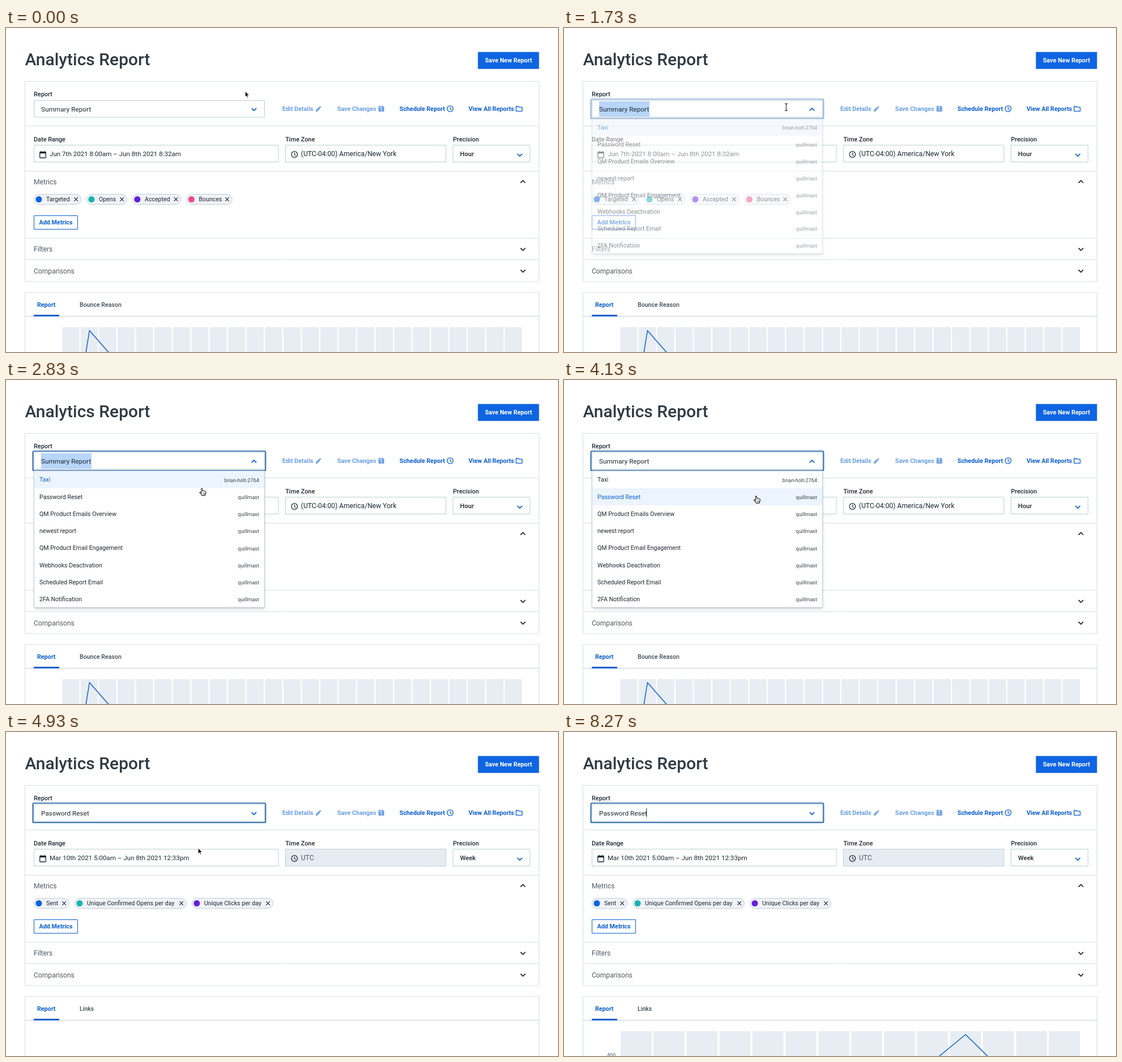
Animation, 975 px wide and 574 px high, one loop 8.43 s. Source, as an HTML page with a canvas:

```html
<!DOCTYPE html>
<html lang="en">
<head>
<meta charset="utf-8">
<title>Analytics Report</title>
<style>
html, body { margin: 0; width: 100%; height: 100%; overflow: hidden; background: #fff; }
canvas { display: block; width: 975px; height: 574px; }
</style>
</head>
<body>
<canvas id="stage"></canvas>
<script>
const W = 975, H = 574, LOOP = 8430;
const BLUE = '#0e64e1', LINK = '#0b5fd0', INK = '#1d2730', GREY = '#4d5862';
const LINE = '#d5dfe8', FIELD = '#b9d0d6', BAR = '#e8edf4';
const canvas = document.getElementById('stage');
const dpr = window.devicePixelRatio || 1;
canvas.width = W * dpr;
canvas.height = H * dpr;
const c = canvas.getContext('2d');

const OPEN = 1630, PRESS = 3900, PICK = 4370, LOADED = 4560, CHART = 6000;
const MENU = [
  ['Taxi', 'brian-holt-2764'], ['Password Reset'], ['QM Product Emails Overview'],
  ['newest report'], ['QM Product Email Engagement'], ['Webhooks Deactivation'],
  ['Scheduled Report Email'], ['2FA Notification']
];
const CHIPS_A = [
  ['Targeted', 49, 133, BLUE], ['Opens', 142, 214, '#17b3b3'],
  ['Accepted', 223, 309.5, '#6320dc'], ['Bounces', 318.5, 400, '#f0478f']
];
const CHIPS_B = [
  ['Sent', 49, 112, BLUE], ['Unique Confirmed Opens per day', 121, 319, '#17b3b3'],
  ['Unique Clicks per day', 328, 472, '#6320dc']
];

const clamp = v => Math.max(0, Math.min(1, v));
const ramp = (t, a, b) => clamp((t - a) / (b - a));
const smooth = p => p * p * (3 - 2 * p);
const mix = (a, b, p) => a + (b - a) * p;

function text(s, x, y, size, color = INK, weight = 400, align = 'left') {
  c.font = `${weight} ${size}px Roboto, sans-serif`;
  c.textAlign = align;
  c.fillStyle = color;
  c.fillText(s, x, y);
}
function rect(x, y, w, h, fill, stroke, width = 1, radius = 0) {
  c.beginPath();
  c.roundRect(x, y, w, h, radius);
  if (fill) { c.fillStyle = fill; c.fill(); }
  if (stroke) { c.strokeStyle = stroke; c.lineWidth = width; c.stroke(); }
}
function poly(points, stroke, width = 1, fill, close) {
  c.beginPath();
  points.forEach(([x, y]) => c.lineTo(x, y));
  if (close) c.closePath();
  if (fill) { c.fillStyle = fill; c.fill(); }
  if (stroke) { c.strokeStyle = stroke; c.lineWidth = width; c.stroke(); }
}
function dot(x, y, r, fill, stroke, width = 1) {
  c.beginPath();
  c.arc(x, y, r, 0, Math.PI * 2);
  if (fill) { c.fillStyle = fill; c.fill(); }
  if (stroke) { c.strokeStyle = stroke; c.lineWidth = width; c.stroke(); }
}
function chevron(x, y, up, color) {
  const d = up ? -2.1 : 2.1;
  poly([[x - 4.2, y - d], [x, y + d], [x + 4.2, y - d]], color, 1.8);
}
function clock(x, y, r, color) {
  dot(x, y, r, null, color, 1.3);
  poly([[x, y - r * .6], [x, y + .4], [x + r * .5, y + r * .4]], color, 1.2);
}
function calendar(x, y) {
  rect(x + .7, y + 1.7, 10.6, 10.3, null, INK, 1.3, 1);
  rect(x + .7, y + 1.7, 10.6, 2.6, INK);
  rect(x + 2.3, y, 1.4, 2.5, INK);
  rect(x + 8.3, y, 1.4, 2.5, INK);
}
function pencil(x, y, color) {
  poly([[x, y + 10], [x, y + 7.7], [x + 6.1, y + 1.6], [x + 8.4, y + 3.9], [x + 2.3, y + 10]], null, 0, color, true);
  poly([[x + 6.8, y + .9], [x + 7.8, y], [x + 10, y + 2.2], [x + 9.1, y + 3.2]], null, 0, color, true);
}
function disk(x, y, color) {
  poly([[x, y], [x + 7.8, y], [x + 10, y + 2.2], [x + 10, y + 10], [x, y + 10]], null, 0, color, true);
  rect(x + 1.3, y + 1.3, 5.7, 2.2, '#fff');
  dot(x + 5, y + 6.7, 1.6, '#fff');
}
function folder(x, y, color) {
  poly([[x, y], [x + 4, y], [x + 5.2, y + 1.4], [x + 10.6, y + 1.4], [x + 10.6, y + 8.4], [x, y + 8.4]], color, 1.3, null, true);
}

function chip([label, l, r, color]) {
  rect(l + .5, 294.5, r - l - 1, 18, '#eff3f7', '#c0ccd7', 1, 9);
  dot(l + 9, 303.5, 5.5, color);
  text(label, l + 22, 307.4, 10.6);
  const x = r - 9.3, y = 303.5;
  poly([[x - 3.3, y - 3.3], [x + 3.3, y + 3.3]], INK, 1.2);
  poly([[x + 3.3, y - 3.3], [x - 3.3, y + 3.3]], INK, 1.2);
}

function page(t, loaded) {
  c.fillStyle = '#fff';
  c.fillRect(0, 0, W, H);
  text('Analytics Report', 33.5, 66, 30, '#2f3a44', 500);
  rect(833.5, 42.5, 108, 30, BLUE);
  text('Save New Report', 887.5, 61.4, 10.8, '#fff', 600, 'center');

  rect(33.5, 94.5, 908, 355, null, LINE);
  [173.5, 253.5, 372.5, 410.5].forEach(y => poly([[33, y], [942, y]], LINE));

  text('Report', 49, 121.3, 10.9, INK, 500);
  c.globalAlpha = .6;
  text('Edit Details', 488, 147, 10.8, LINK, 600);
  pencil(547, 138, LINK);
  text('Save Changes', 585, 147, 10.8, LINK, 600);
  disk(658, 138, LINK);
  c.globalAlpha = 1;
  text('Schedule Report', 695, 147, 10.8, LINK, 600);
  clock(784.5, 143, 5.2, LINK);
  text('View All Reports', 817, 147, 10.8, LINK, 600);
  folder(901, 139, LINK);

  text('Date Range', 49, 201, 10.9, INK, 500);
  text('Time Zone', 493.5, 201, 10.9, INK, 500);
  text('Precision', 789.5, 201, 10.9, INK, 500);
  rect(49.5, 207.5, 431.5, 30, '#fff', FIELD);
  rect(493.5, 207.5, 283.5, 30, loaded ? '#e7ecf3' : '#fff', FIELD);
  rect(789.5, 207.5, 136, 30, '#fff', FIELD);
  calendar(59, 218);
  clock(509.5, 224, 5.3, INK);
  text(loaded ? 'Mar 10th 2021 5:00am – Jun 8th 2021 12:33pm' : 'Jun 7th 2021 8:00am – Jun 8th 2021 8:32am', 77, 227.3, 11.6);
  text(loaded ? 'UTC' : '(UTC-04:00) America/New York', 521, 227.3, 12.1, loaded ? GREY : INK);
  text(loaded ? 'Week' : 'Hour', 802, 227.3, 11.2, INK, 500);
  chevron(907.5, 225, false, LINK);

  text('Metrics', 49, 277.2, 12.1, GREY);
  text('Filters', 49, 396.2, 12.1, GREY);
  text('Comparisons', 49, 434.8, 12.1, GREY);
  chevron(913, 272.3, true, INK);
  chevron(913, 392, false, INK);
  chevron(913, 430.5, false, INK);
  (loaded ? CHIPS_B : CHIPS_A).forEach(chip);
  rect(49.5, 332.5, 77, 24, '#fff', LINK);
  text('Add Metrics', 88, 348.4, 10.8, LINK, 600, 'center');

  rect(33.5, 468.5, 908, 120, null, LINE);
  poly([[33, 510.7], [942, 510.7]], '#cbd6e1', 1.2);
  rect(49, 508, 45, 3, LINK);
  text('Report', 55, 494, 10.7, LINK, 600);
  text(loaded ? 'Links' : 'Bounce Reason', 130, 494, 10.6, '#3f4a54', 500);
  chart(t, loaded);
}

function chart(t, loaded) {
  if (loaded && t < CHART) return;
  const n = loaded ? 14 : 25, w = loaded ? 54.8 : 30.3;
  const left = loaded ? 100 : 99.3, step = (911.3 - w - left) / (n - 1);
  for (let i = 0; i < n; i++) rect(left + i * step, 530, w, 50, BAR);
  c.lineJoin = 'round';
  if (!loaded) {
    poly([[140.3, 580], [147.4, 536], [186, 580]], LINK, 1.5);
    return;
  }
  text('400', 91, 576.3, 9.1, GREY, 400, 'right');
  const reach = mix(660, 760, ramp(t, 6400, 6630));
  c.save();
  c.beginPath();
  c.rect(0, 500, reach, 100);
  c.clip();
  poly([[656, 580], [709.3, 536], [754, 580]], LINK, 1.5);
  c.restore();
}

function select(t, open) {
  const focus = ramp(t, OPEN, OPEN + 200);
  rect(49.5, 128.5, 407, 29.5, '#fff', FIELD);
  if (focus) {
    c.globalAlpha = focus;
    rect(47.5, 126, 411, 34.4, null, '#0c519f', 1.7, 2);
    c.globalAlpha = 1;
  }
  const picked = t >= PICK;
  if (t >= OPEN && t < PRESS) rect(62, 130, 89, 27, '#b8d5fa');
  text(picked ? 'Password Reset' : 'Summary Report', 62, 147.7, 11.8);
  chevron(438, 144.3, open, LINK);
  const caret = t < 4800 || (t >= 5300 && t < 5800) || (t >= 6300 && t < 6770) ||
    (t >= 7270 && t < 7770) || t >= 8270;
  if (picked && caret) rect(145.3, 135, 1, 16, INK);
}

// The shadow is painted only outside the box, so a fading menu stays white.
function menuShadow(x, y, w, h) {
  c.save();
  c.beginPath();
  c.rect(0, y, W, H);
  c.rect(x, y, w, h);
  c.clip('evenodd');
  c.shadowColor = 'rgba(40, 60, 80, .3)';
  c.shadowBlur = 5 * dpr;
  c.shadowOffsetY = 2 * dpr;
  rect(x, y, w, h, '#fff');
  c.restore();
}

function menu(t, hover) {
  const a = t < PICK ? ramp(t, OPEN, OPEN + 200) : 1 - ramp(t, PICK, PICK + 170);
  if (!a) return;
  c.save();
  c.globalAlpha = a;
  c.translate(0, 161);
  c.scale(1, mix(.974, 1, a));
  c.translate(0, -161);
  menuShadow(49.5, 161, 407, 241.8);
  rect(49.5, 161, 407, 241.8, '#fff', '#c3ced8');
  MENU.forEach(([name, owner = 'quillmast'], i) => {
    const y = 161.5 + i * 30.25, on = i === hover;
    if (on) rect(50, y, 406, 30.2, '#ecf4fe');
    text(name, 59, y + 18.9, 10.6, on ? LINK : INK);
    text(owner, 447, y + 19, 9.1, '#3a444e', 400, 'right');
  });
  c.restore();
}

function arrow(x, y) {
  poly([[0, 0], [0, 10.5], [2.4, 8.3], [4.1, 12.2], [5.9, 11.4], [4.2, 7.6], [7.4, 7.5]]
    .map(([a, b]) => [x + a, y + b]), '#fff', 1.4, '#111', true);
  poly([[0.4, 1], [.4, 9.4], [2.6, 7.4], [4.5, 11.3], [5.1, 11], [3.4, 7], [6.4, 6.9]]
    .map(([a, b]) => [x + a, y + b]), null, 0, '#111', true);
}
function beam(x, y) {
  const strokes = [[[0, -5], [0, 5.5]], [[-2.6, -6.2], [-1, -6], [0, -5], [1, -6], [2.6, -6.2]],
    [[-2.6, 6.7], [-1, 6.5], [0, 5.5], [1, 6.5], [2.6, 6.7]]];
  strokes.forEach(s => poly(s.map(([a, b]) => [x + a, y + b]), '#222', 1.1));
}
function hand(x, y) {
  poly([[-1, .8], [0, 0], [1, .8], [1.3, 4.2], [2.8, 4], [3.6, 4.8], [5, 4.6], [5.7, 5.5], [7, 5.8],
    [7.2, 8.5], [6, 11], [5.8, 12.6], [0, 12.6], [-.8, 10.8], [-3.6, 7.6], [-3.2, 6.4], [-2, 6.6], [-.5, 8]]
    .map(([a, b]) => [x + a, y + b]), '#222', 1.1, '#fff', true);
  [2, 3.7, 5.3].forEach(d => poly([[x + d, y + 8], [x + d, y + 11]], '#222', .7));
}

function pointer(t) {
  if (t < 2500) {
    const p = smooth(ramp(t, 1000, 1500));
    return [mix(422.5, 392.5, p), mix(112, 140, p)];
  }
  if (t < 7000) {
    const p = smooth(ramp(t, 2500, 2860)), q = smooth(ramp(t, 2830, 3200));
    return [mix(392.5, 345, p) - 5.7 * q, mix(140, 193, p) + 12.5 * q];
  }
  const p = smooth(ramp(t, 6980, 7620));
  return [mix(339.3, 910, p), mix(205.5, 6, p)];
}

function draw(t) {
  c.setTransform(dpr, 0, 0, dpr, 0, 0);
  c.globalAlpha = 1;
  c.lineJoin = 'miter';
  const [x, y] = pointer(t);
  const open = t >= OPEN && t < PICK;
  page(t, t >= LOADED);
  select(t, open);
  menu(t, t < 2870 ? 0 : 1);
  if (t >= 7600) return;
  if (open && y > 161) hand(x, y);
  else if (t < PICK && y > 128 && y <= 161) beam(x, y);
  else arrow(x, y);
}

function tick() {
  draw(performance.now() % LOOP);
  requestAnimationFrame(tick);
}
tick();
</script>
</body>
</html>
```
